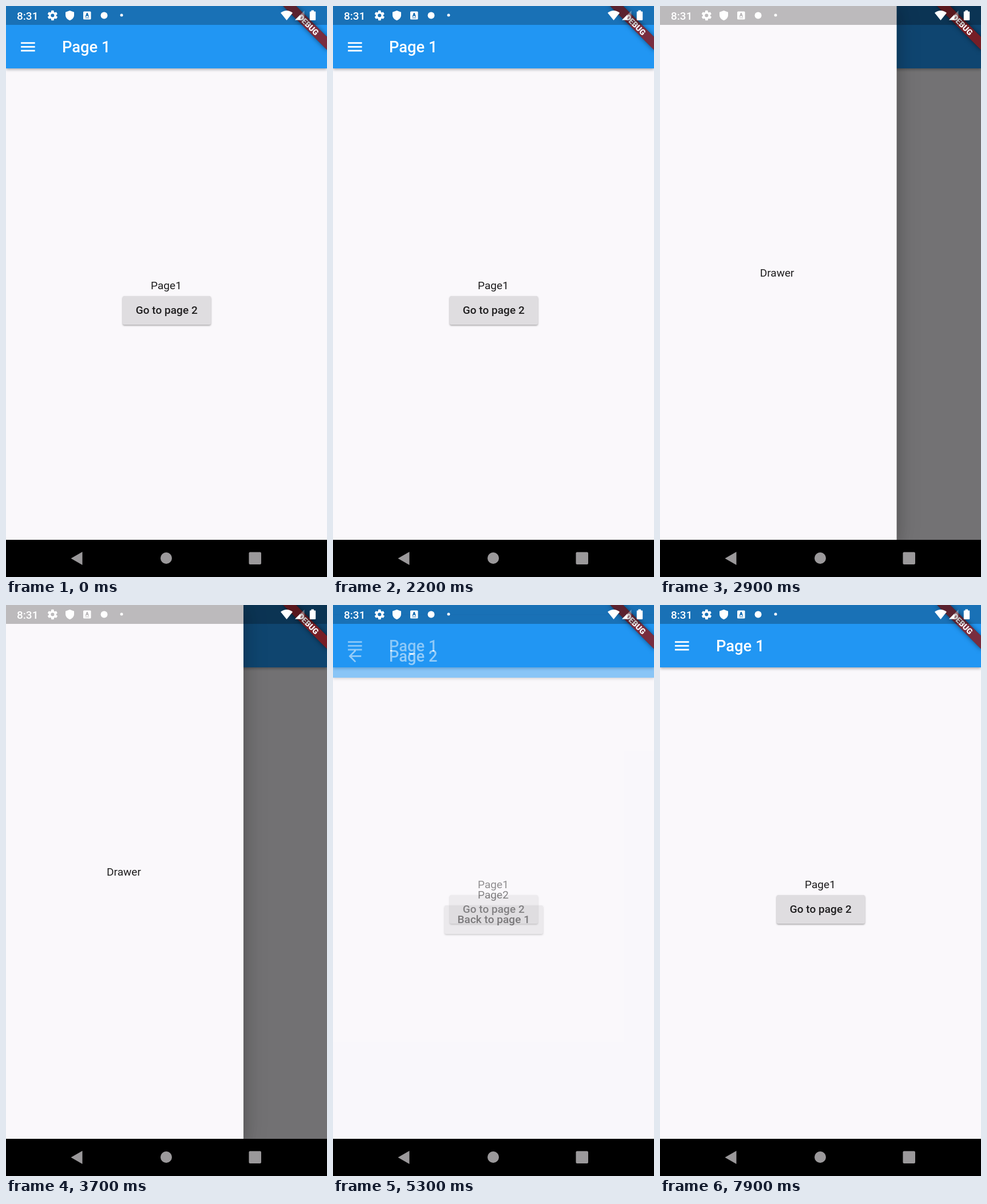
An HTML page that plays this animation: 561 px wide and 998 px high, repeating every 8 s.

```html
<!DOCTYPE html>
<html lang="en">
<head>
<meta charset="utf-8">
<title>Drawer and pages</title>
<style>
  html, body { margin: 0; width: 100%; height: 100%; overflow: hidden; background: #000; }
  body { font: 400 19.09px/24px Roboto, sans-serif; color: #1f1e1f; }
  div, svg { position: absolute; }
  #app { left: 0; top: 0; width: 561px; height: 933px; overflow: hidden; }
  .page { inset: 0; background: #faf8fb; }
  .bar {
    left: 0; top: 0; width: 561px; height: 109px;
    background: #2196f3; box-shadow: 0 2px 5px rgba(0, 0, 0, .32);
  }
  .bar svg { left: 21.6px; top: 54.6px; width: 32.73px; height: 32.73px; fill: #fff; }
  .title { left: 98px; top: 54px; font: 500 27.27px/36px Roboto, sans-serif; color: #fff; white-space: nowrap; }
  .label { left: 0; width: 560px; top: 476.5px; text-align: center; }
  .button {
    top: 507px; height: 49.5px; border-radius: 2.7px; background: #dfdde0;
    box-shadow: 0 1.5px 3px rgba(0, 0, 0, .35);
    font-weight: 500; line-height: 50px; text-align: center; white-space: nowrap;
  }
  #scrim { inset: 0; background: #000; }
  #drawer {
    left: 0; top: 0; width: 414.5px; height: 933px; background: #faf8fb;
    box-shadow: 0 8px 22px rgba(0, 0, 0, .2), 0 8px 41px 4px rgba(0, 0, 0, .12);
  }
  #drawer div { left: 0; width: 412px; top: 454.5px; text-align: center; }
  #banner {
    left: 473.7px; top: 24.6px; width: 109px; height: 16.4px; transform: rotate(45deg);
    background: linear-gradient(#b71c1ca0, #b71c1ca0), rgba(0, 0, 0, .5);
    box-shadow: 0 0 8px rgba(0, 0, 0, .5);
    font: 900 13.9px/16.4px Roboto, sans-serif; color: #fff; text-align: center;
  }
  #status { left: 0; top: 0; width: 561px; height: 33px; background: rgba(0, 0, 0, .25); }
  #system { left: 0; top: 0; }
</style>
</head>
<body>
<div id="app">
  <div class="page" id="page1"></div>
  <div class="page" id="page2"></div>
  <div id="scrim"></div>
  <div id="drawer"><div>Drawer</div></div>
  <div id="banner">DEBUG</div>
  <div id="status"></div>
</div>
<svg id="system" width="561" height="998" fill="#fff">
  <text x="19" y="23.8" font-size="19" font-weight="500">8:31</text>
  <path transform="translate(70.9 6.1) scale(.87)" d="M19.4 13a7.5 7.5 0 0 0 0-2l2.1-1.6a.5.5 0 0 0 .1-.7l-2-3.4a.5.5 0 0 0-.6-.2l-2.5 1a7.3 7.3 0 0 0-1.7-1L14.5 2.400a.5.5 0 0 0-.5-.4h-4a.5.5 0 0 0-.5.4l-.4 2.700a7.700 7.700 0 0 0-1.700 1l-2.500-1a.5.5 0 0 0-.6.2l-2 3.400a.5.5 0 0 0 .1.700L4.600 11a7.900 7.900 0 0 0 0 2l-2.100 1.600a.5.5 0 0 0-.1.700l2 3.400a.5.5 0 0 0 .6.2l2.500-1a7.300 7.300 0 0 0 1.700 1l.4 2.700a.5.5 0 0 0 .5.400h4a.5.5 0 0 0 .5-.4l.4-2.700a7.700 7.700 0 0 0 1.700-1l2.500 1a.5.5 0 0 0 .6-.2l2-3.400a.5.5 0 0 0-.1-.700zM12 15.500a3.500 3.500 0 1 1 0-7 3.500 3.500 0 0 1 0 7z"/>
  <path d="M111.500 8l7.500 2.800v5c0 4.400-3.200 8.200-7.500 9.400-4.300-1.200-7.500-5-7.500-9.400v-5z"/>
  <path fill-rule="evenodd" d="M136.500 9.500h10.500q1.500 0 1.500 1.500v11q0 1.500-1.500 1.500h-10.500q-1.500 0-1.500-1.500v-11q0-1.500 1.500-1.500zM138.500 19l2.400-7h1.800l2.400 7h-1.600l-.4-1.500h-2.600l-.4 1.500zM138.500 20.300h6.800v1h-6.800z"/>
  <circle cx="171.500" cy="16.500" r="6"/>
  <circle cx="202" cy="16" r="2.500"/>
  <path d="M480 12q10.500-8 21 0L490.500 25z"/>
  <path opacity=".35" d="M505 24.500L521.500 8v16.500z"/>
  <path d="M505 24.500l9.500-9.500v9.500z"/>
  <path d="M533.500 9.500v-2h4.500v2h2q1.200 0 1.200 1.200v13q0 1.300-1.200 1.300h-8q-1.200 0-1.200-1.300v-13q0-1.200 1.200-1.200z"/>
  <g fill="#9b999b">
    <path d="M113.500 965.500L133.500 954v23z"/>
    <circle cx="280" cy="965" r="10"/>
    <rect x="424.500" y="954.500" width="21.500" height="21.500" rx="2"/>
  </g>
</svg>
<script>
const LOOP = 8000, DRAWER_WIDTH = 414.5, PAGE_HEIGHT = 933;
const MENU = 'M3 18h18v-2H3zm0-5h18v-2H3zm0-7v2h18V6z';
const ARROW = 'M20 11H7.83l5.59-5.59L12 4l-8 8 8 8 1.41-1.41L7.83 13H20z';
const $ = id => document.getElementById(id);

function fillPage(n, icon, action, left, width) {
  $('page' + n).innerHTML = `
    <div class="bar"><svg viewBox="0 0 24 24"><path d="${icon}"/></svg><div class="title">Page ${n}</div></div>
    <div class="label">Page${n}</div>
    <div class="button" style="left:${left}px;width:${width}px">${action}</div>`;
}
fillPage(1, MENU, 'Go to page 2', 204, 153.5);
fillPage(2, ARROW, 'Back to page 1', 195, 171.5);

const progress = (t, start, length) => Math.min(1, Math.max(0, (t - start) / length));
const sine = u => (1 - Math.cos(Math.PI * u)) / 2;

// CSS-style cubic Bézier, solved for x by bisection
function bezier(x1, y1, x2, y2) {
  const at = (a, b, s) => 3 * a * s * (1 - s) ** 2 + 3 * b * s * s * (1 - s) + s ** 3;
  return x => {
    let lo = 0, hi = 1;
    for (let i = 0; i < 24; i++) {
      const mid = (lo + hi) / 2;
      if (at(x1, x2, mid) < x) lo = mid; else hi = mid;
    }
    return at(y1, y2, (lo + hi) / 2);
  };
}
const fastOutSlowIn = bezier(.4, 0, .2, 1), easeIn = bezier(.42, 0, 1, 1);

function draw(t) {
  const open = sine(progress(t, 2561, 353)) - sine(progress(t, 3864, 353));
  $('scrim').style.opacity = .54 * open;
  $('drawer').style.visibility = open > .0001 ? 'visible' : 'hidden';
  $('drawer').style.transform = `translateX(${(open - 1) * DRAWER_WIDTH}px)`;

  const route = progress(t, 5100, 300) - progress(t, 7400, 300);
  const page = $('page2').style;
  page.visibility = route > 0 ? 'visible' : 'hidden';
  page.opacity = route < 1 ? easeIn(route) : 1;
  page.transform = `translateY(${(1 - fastOutSlowIn(route)) * PAGE_HEIGHT / 4}px)`;
}

const begin = performance.now();
function tick() {
  draw((performance.now() - begin) % LOOP);
  requestAnimationFrame(tick);
}
tick();
</script>
</body>
</html>
```
